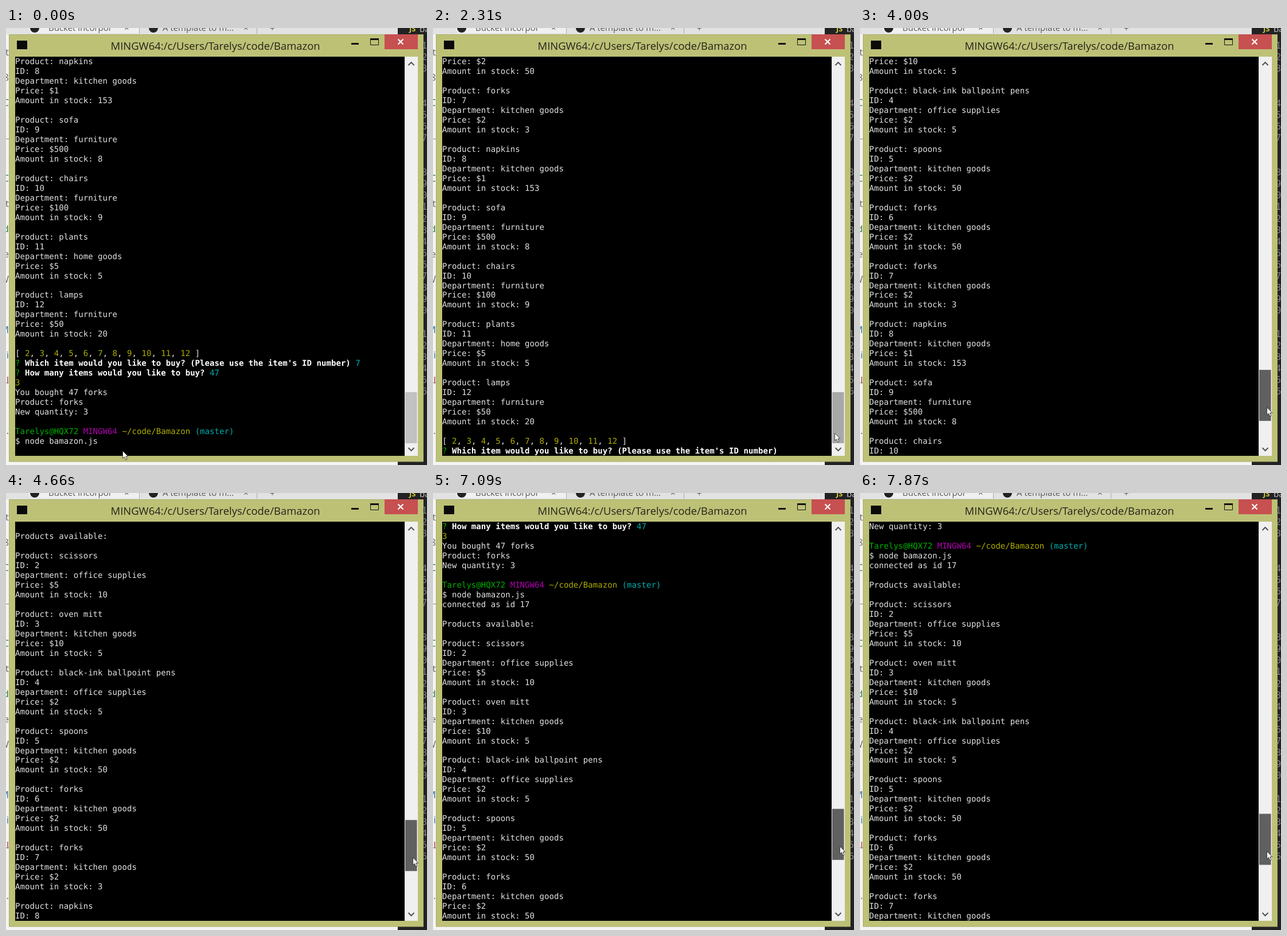
An HTML page that plays this animation: 734 px wide and 762 px high, repeating every 7.99 s.

```html
<!DOCTYPE html>
<html lang="en">
<head>
<meta charset="utf-8">
<title>Terminal</title>
<style>
  html, body { margin: 0; width: 100%; height: 100%; overflow: hidden; background: #f4f4f4; }
  svg { display: block; width: 734px; height: 762px; }
  text { white-space: pre; }
  #rows { font: 14.09px "DejaVu Sans Mono", monospace; text-rendering: geometricPrecision; }
  #gutter { font: 15px "DejaVu Sans Mono", monospace; fill: #858585; }
  .ui { font-family: "Open Sans", "Noto Sans", sans-serif; }
</style>
</head>
<body>
<svg viewBox="0 0 734 762">
  <defs>
    <clipPath id="screen"><rect x="16" y="50" width="680" height="696"/></clipPath>
  </defs>

  <!-- what lies behind the window -->
  <rect width="684" height="762" fill="#f4f4f4"/>
  <rect width="684" height="11" fill="#e2e2e2"/>
  <path d="M38 0H232V9H44Z" fill="#f0f0f0"/>
  <path d="M232.500 0V10M437.500 0V10" stroke="#a9a9a9"/>
  <rect x="683" width="51" height="762" fill="#222224"/>
  <g class="ui" font-size="15" fill="#555">
    <circle cx="50" cy="0" r="8" fill="#222"/>
    <text x="74" y="5">Bucket incorpor</text><text x="206" y="5">×</text>
    <circle cx="257" cy="0" r="8" fill="#222"/>
    <text x="273" y="5">A template to m...</text><text x="414" y="5">×</text>
    <text x="460" y="6">+</text>
    <text x="703" y="6" fill="#cbcb41" font-weight="bold" font-size="13">JS</text>
    <text x="721" y="7" fill="#c8c8c8">ba</text>
  </g>
  <g id="page" class="ui" font-size="17"></g>
  <path d="M0 193.500H6M0 618.500H6" stroke="#888"/>
  <g id="gutter"></g>

  <!-- window -->
  <rect x="5.500" y="11.500" width="722" height="744.500" fill="#bdc176" stroke="#a9ad68"/>
  <rect x="19" y="22" width="18" height="15" fill="#0a0a0a"/>
  <text class="ui" x="182.500" y="37.500" font-size="18.450" fill="#24241a">MINGW64:/c/Users/Tarelys/code/Bamazon</text>
  <rect x="602" y="26" width="13" height="3" fill="#111"/>
  <path d="M635.500 19V29.500H649.500V19" fill="none" stroke="#111"/>
  <rect x="635" y="18" width="15" height="3" fill="#111"/>
  <rect x="660" y="11" width="58" height="26" fill="#c75050"/>
  <path d="M683.500 19.500l9 9m0-9l-9 9" stroke="#fff" stroke-width="2.200"/>

  <rect x="16" y="50" width="680" height="696"/>
  <g clip-path="url(#screen)">
    <g id="rows"></g>
    <rect id="caret" x="610" y="742.500" width="8.500" height="2.500" fill="#bfbfbf"/>
  </g>
  <rect x="695" y="50" width="23" height="696" fill="#f0f0f0"/>
  <path d="M701.500 65l5-5 5 5M701.500 732l5 5 5-5" fill="none" stroke="#505050" stroke-width="2"/>
  <rect id="thumb" x="696" width="20.500" height="89"/>
  <path id="pointer" d="M.5 .5V13.500L3.500 10.800L5.700 16L8 15L5.800 10H9.800Z" fill="#fff" stroke="#222" stroke-width=".8"/>
</svg>
<script>
const $ = id => document.getElementById(id);
const LOOP = 7990, ROWS = 41, ROW_H = 16.97;
const INK = { n: '#e2e2e2', w: '#ffffff', g: '#00b000', y: '#adad00', m: '#b400b4', c: '#00adad' };

function add(parent, tag, content, attrs) {
  const node = document.createElementNS('http://www.w3.org/2000/svg', tag);
  for (const [k, v] of Object.entries(attrs)) node.setAttribute(k, v);
  node.textContent = content;
  parent.append(node);
  return node;
}

// Slivers of the page and the editor that show beside the window
[...'t8C  CtdeW Mil .'].forEach((s, i) => {
  const fill = 'Cd'.includes(s) ? '#2c7a33' : 'Mi'.includes(s) ? '#2b6fa0' : s === 'l' ? '#a33' : '#666';
  add($('page'), 'text', s, { x: 5, y: 48 + i * 44, fill, 'text-anchor': 'end' });
});
const unnumbered = [3, 4, 9, 10, 24];
for (let row = 0, label = 1; row <= 30; row++) {
  if (unnumbered.includes(row)) continue;
  add($('gutter'), 'text', label++ % 10, { x: 725, y: 36 + row * 20.1 });
}

// Terminal contents: each line is a list of [ink, text] runs
const plain = s => [['n', s]];
const products = [
  ['scissors', 'office supplies', 5, 10], ['oven mitt', 'kitchen goods', 10, 5],
  ['black-ink ballpoint pens', 'office supplies', 2, 5], ['spoons', 'kitchen goods', 2, 50],
  ['forks', 'kitchen goods', 2, 50], ['forks', 'kitchen goods', 2, 3],
  ['napkins', 'kitchen goods', 1, 153], ['sofa', 'furniture', 500, 8],
  ['chairs', 'furniture', 100, 9], ['plants', 'home goods', 5, 5], ['lamps', 'furniture', 50, 20]
];
const catalog = products.flatMap(([name, dept, price, stock], i) => [
  `Product: ${name}`, `ID: ${i + 2}`, `Department: ${dept}`, `Price: $${price}`,
  `Amount in stock: ${stock}`, ''].map(plain));
const idList = [['n', '[ '], ...products.flatMap((_, i) => [['y', `${i + 2}`], ['n', i < 10 ? ', ' : ' ]']])];
const ask = (question, answer) => [['g', '? '], ['w', question + ' '], ['c', answer]];
const askItem = answer => ask("Which item would you like to buy? (Please use the item's ID number)", answer);

const buffer = [
  ...catalog, idList, askItem('7'),
  ask('How many items would you like to buy?', '47'),
  [['y', '3']],
  ...['You bought 47 forks', 'Product: forks', 'New quantity: 3', ''].map(plain),
  [['g', 'Tarelys@HQX72 '], ['m', 'MINGW64 '], ['y', '~/code/Bamazon '], ['c', '(master)']],
  ...['$ node bamazon.js', 'connected as id 17', '', 'Products available:', ''].map(plain),
  ...catalog, idList, askItem('')
];
const commandLine = buffer.findIndex(line => line[0][1].startsWith('$ node'));

const rowNodes = Array.from({ length: ROWS }, (_, i) =>
  add($('rows'), 'text', '', { x: 16, y: 63.2 + i * ROW_H }));

let shown = null;
function showRows(top, last) {
  const key = top + ':' + last;
  if (key === shown) return;
  shown = key;
  rowNodes.forEach((node, i) => {
    node.replaceChildren();
    if (top + i > last) return;
    for (const [ink, s] of buffer[top + i])
      add(node, 'tspan', s, { fill: INK[ink], 'font-weight': ink === 'w' ? 'bold' : 'normal' });
  });
}

// Key points: [time, x, y] of the free pointer, [time, rows] scrolled up by dragging
const path = [[1370, 203, 737], [1890, 590, 591], [2280, 700, 706], [2600, 709, 700]];
const drag = [[3190, 0], [3970, 18], [4620, 30], [4880, 36], [5790, 40], [6960, 40], [7090, 39], [7870, 35]];

function tween(keys, t) {
  const next = keys.findIndex(k => k[0] > t);
  if (next < 1) return keys.at(next).slice(1);
  const a = keys[next - 1], b = keys[next];
  const p = (t - a[0]) / (b[0] - a[0]);
  return a.slice(1).map((v, i) => v + (b[i + 1] - v) * p);
}

const TICK = 130;
const sampled = t => Math.floor((t - 70) / TICK) * TICK + 70;

function render(t) {
  const now = sampled(t);
  const [scrolled] = tween(drag, now);
  const thumbTop = 635 - 2.16 * scrolled;
  const [x, freeY] = tween(path, now);
  const y = scrolled > 0 ? thumbTop + 65 : freeY;

  if (t < 780) showRows(commandLine - ROWS + 2, commandLine);
  else showRows(buffer.length - ROWS - Math.round(scrolled), buffer.length - 1);

  $('thumb').setAttribute('y', thumbTop);
  $('thumb').setAttribute('fill', t >= 3220 ? '#606060' : x > 695 ? '#a8a8a8' : '#c1c1c1');
  $('pointer').setAttribute('transform', `translate(${x} ${y})`);
  const caretOn = t > 1560 && scrolled === 0 && Math.floor((t - 1560) / 630) % 2 === 0;
  $('caret').setAttribute('visibility', caretOn ? 'visible' : 'hidden');
}

const start = performance.now();
function tick() {
  render((performance.now() - start) % LOOP);
  requestAnimationFrame(tick);
}
tick();
</script>
</body>
</html>
```
